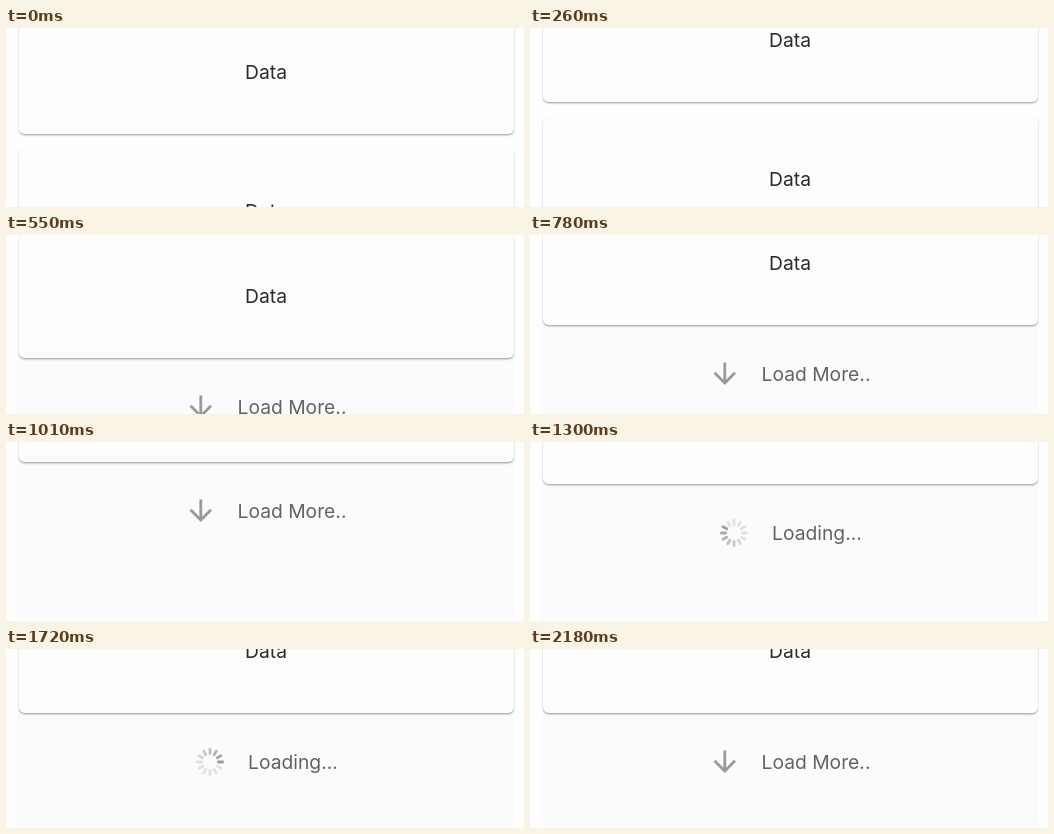
An HTML page for the animation above (3710 ms loop, 518 px wide and 179 px high).

```html
<!DOCTYPE html>
<html lang="en">
<head>
<meta charset="utf-8">
<title>Load more list</title>
<style>
  html, body { margin: 0; width: 100%; height: 100%; overflow: hidden; background: #fefefe; }
  #stage { position: relative; width: 518px; height: 179px; overflow: hidden;
    font: 19.3px/28px Inter, "Open Sans", sans-serif; }
  #list { position: absolute; left: 0; top: 1px; width: 518px; height: 0; }
  .card { position: absolute; left: 12.5px; width: 495px; height: 124px; border-radius: 5.6px;
    background: #fdfdfd; color: #2a2a2a; line-height: 124px; text-align: center;
    box-shadow: 0 1.4px 1.6px rgba(0,0,0,.24), 0 .5px 1.4px rgba(0,0,0,.18); }
  #footer { position: absolute; left: 11px; top: -7px; width: 497px; height: 260px; background: #fbfbfb; }
  .row { position: absolute; left: 0; top: 34px; width: 518px; height: 28px; color: #626262; white-space: pre; }
  .row svg { position: absolute; overflow: visible; }
  .row span { position: absolute; top: 0; }
</style>
</head>
<body>
<div id="stage">
  <div id="list">
    <div id="footer"></div>
    <div class="card" style="top:-264px">Data</div>
    <div class="card" style="top:-125px">Data</div>
    <div class="row" id="idle">
      <svg style="left:177.5px;top:-2.8px" width="33.6" height="33.6" viewBox="0 0 24 24">
        <path fill="#999" d="M20 12l-1.41-1.41L13 16.17V4h-2v12.17l-5.58-5.59L4 12l8 8z"/>
      </svg>
      <span style="left:231.5px">Load More..</span>
    </div>
    <div class="row" id="loading">
      <svg id="spinner" style="left:190px;top:0" width="28" height="28" viewBox="-14 -14 28 28"></svg>
      <span style="left:242px">Loading...</span>
    </div>
  </div>
</div>
<script>
const LOOP = 3710, LOAD_START = 1190, LOAD_END = 2180;
const STEP = 57.6, STEP_OFFSET = 29;
const SPIN_START = 1212, TICKS = 12, TICK_MS = 1000 / TICKS;

const easeInOut = p => p * p * (3 - 2 * p);
const easeOut = p => 1 - (1 - p) ** 3;

// How far a move of the given distance has come at time t.
const move = (t, from, to, distance, ease) =>
  distance * ease(Math.min(1, Math.max(0, (t - from) / (to - from))));

// Bottom edge of the last card: two swipes up, then a spring back.
const cardBottom = t => Math.round(245
  - move(t, 90, 610, 127, easeInOut)
  - move(t, 630, 1060, 102, easeInOut)
  + move(t, LOAD_START, 1650, 48, easeOut));

const byId = id => document.getElementById(id);
const list = byId('list'), idle = byId('idle'), loading = byId('loading');

const ticks = Array.from({ length: TICKS }, (_, i) => {
  const tick = document.createElementNS('http://www.w3.org/2000/svg', 'rect');
  const attrs = { x: -14, y: -1.4, width: 7, height: 2.8, rx: 1.4, fill: '#48484d',
    transform: `rotate(${-i * 360 / TICKS})` };
  for (const name in attrs) tick.setAttribute(name, attrs[name]);
  return byId('spinner').appendChild(tick);
});

function render(t) {
  const sampled = Math.floor((t - STEP_OFFSET) / STEP) * STEP + STEP_OFFSET;
  list.style.transform = `translateY(${cardBottom(sampled)}px)`;

  const busy = t >= LOAD_START && t < LOAD_END;
  idle.style.visibility = busy ? 'hidden' : 'visible';
  loading.style.visibility = busy ? 'visible' : 'hidden';

  const active = Math.max(0, Math.floor((t - SPIN_START) / TICK_MS));
  ticks.forEach((tick, i) => {
    const age = (i + active) % TICKS;
    tick.setAttribute('opacity', Math.max(0.14, 0.53 - age * 0.065));
  });
}

const start = performance.now();
function frame() {
  render((performance.now() - start) % LOOP);
  requestAnimationFrame(frame);
}
frame();
</script>
</body>
</html>
```
